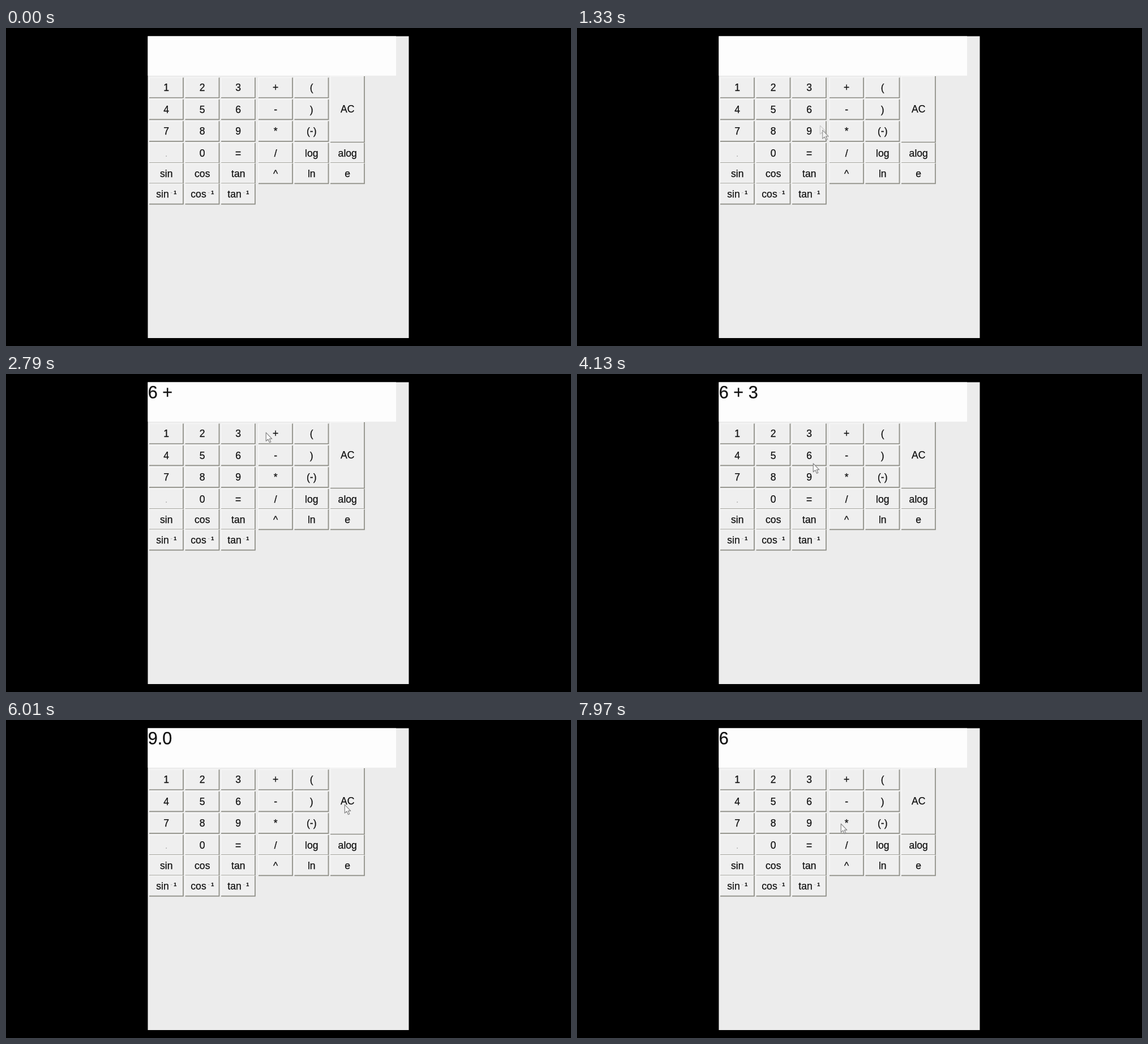
Write an HTML page that moves like this. It is 998 px wide and 561 px high and loops after 8000 ms.

```html
<!DOCTYPE html>
<html lang="en">
<head>
<meta charset="utf-8">
<title>Calculator</title>
<style>
  html, body { margin: 0; width: 100%; height: 100%; overflow: hidden; background: #000; }
  svg { display: block; width: 100vw; height: 100vh; }
  text { font-family: "Liberation Sans", Arial, sans-serif; fill: #111; stroke: #111; stroke-width: .25; }
  .key { font-size: 17.6px; text-anchor: middle; }
  .power { font-size: 9px; font-weight: bold; }
  .faint { opacity: .5; fill-opacity: .5; stroke: none; }
  #readout { font-size: 30.6px; white-space: pre; }
  .edge { fill: none; stroke-width: 1.7; }
  .arrow { fill: #fafafa; stroke: #858585; stroke-width: 1.2; stroke-linejoin: round; }
</style>
</head>
<body>
<svg viewBox="0 0 998 561">
  <defs><path id="arrow" d="M0 0V15L3.5 11.8L6.2 17.5L8.5 16.4L6 11H10.5Z"/></defs>
  <rect width="998" height="561" fill="#000"/>
  <rect x="250.5" y="14.5" width="461" height="532.5" fill="#ececec"/>
  <rect x="250.5" y="14.5" width="438.5" height="69.5" fill="#fdfdfd"/>
  <text id="readout" x="250.8" y="43"></text>
  <g id="keys"></g>
  <use id="ghost" class="arrow" href="#arrow"/>
  <use id="cursor" class="arrow" href="#arrow"/>
</svg>
<script>
const LOOP = 8000, STEP = 1000 / 24;
const $ = id => document.getElementById(id);

// Keypad
const KEY_W = 60.5, KEY_H = 35.5;
const layout = ["1 2 3 + (", "4 5 6 - )", "7 8 9 * (-)", ". 0 = / log alog", "sin cos tan ^ ln e", "sin⁻¹ cos⁻¹ tan⁻¹"];
const columnX = c => 253 + 63.5 * c + (c > 2 ? 2.5 : 0);
const rowBottom = r => 123 + 38.4 * Math.min(r, 3) + 36.2 * Math.max(r - 3, 0);
const centers = {};

function caption(label) {
  if (label === ".") return '<tspan class="faint">.</tspan>';
  return label.replace("⁻¹", '<tspan class="power" dx="3" dy="-6"><tspan class="faint">-</tspan><tspan dx="2.5">1</tspan></tspan>');
}

function key(label, x, bottom, height = KEY_H) {
  const right = x + KEY_W, top = bottom - height;
  const [cx, cy] = centers[label] = [x + KEY_W / 2, bottom - height / 2];
  return `<rect x="${x}" y="${top}" width="${KEY_W}" height="${height}" fill="#efefef"/>
    <path class="edge" stroke="#f6f6f6" d="M${x} ${bottom}V${top}H${right}"/>
    <path class="edge" stroke="#8c8c84" d="M${x} ${bottom}H${right - .5}V${top}"/>
    <text class="key" x="${cx}" y="${cy + 6.2}">${caption(label)}</text>`;
}

$("keys").innerHTML = layout.map((line, r) =>
  line.split(" ").map((label, c) => key(label, columnX(c), rowBottom(r))).join("")
).join("") + key("AC", columnX(5), 201.5, 116.5);

// Each press: key, time, and where the pointer rests relative to the key's centre
const REST = 240, LEAD = 150, ENTER = 600;
const presses = [
  ["6", 1750, 7, 6], ["+", 2600, -17, -2], ["3", 3450, 7, 3], ["=", 4800, 7, 3],
  ["AC", 6100, -5, 6], ["6", 7300, 7, 6], ["*", 8100, -10, 1]
].map(([label, time, dx, dy]) => ({ label, time, x: centers[label][0] + dx, y: centers[label][1] + dy }));
const stops = [{ time: ENTER - REST, x: 511, y: 290 }, ...presses];

function pointerAt(time) {
  const i = Math.max(1, stops.findIndex(s => s.time > time));
  const from = stops[i - 1], to = stops[i];
  const leave = from.time + REST, arrive = to.time - LEAD;
  const u = Math.min(1, Math.max(0, (time - leave) / (arrive - leave)));
  const ease = u * u * (3 - 2 * u);
  // Sideways journeys sag a little
  const sag = .12 * Math.abs(to.x - from.x) * Math.sin(Math.PI * ease);
  return [from.x + (to.x - from.x) * ease, from.y + (to.y - from.y) * ease + sag];
}

function type(text, { label }) {
  if (label === "AC") return "";
  if (label === "=") return text.split("+").reduce((sum, n) => sum + Number(n), 0).toFixed(1);
  return text + (label === "+" ? " + " : label);
}

function place(node, [x, y], opacity) {
  node.setAttribute("transform", `translate(${x.toFixed(1)} ${y.toFixed(1)})`);
  node.setAttribute("opacity", opacity);
}

function draw(now) {
  const time = Math.floor(((now % LOOP) + 4) / STEP) * STEP % LOOP;
  $("readout").textContent = presses.filter(p => p.time <= time).reduce(type, "");

  const shown = time >= ENTER;
  const here = pointerAt(time), next = pointerAt(time + STEP);
  const fast = Math.hypot(next[0] - here[0], next[1] - here[1]) > 8.5;
  place($("cursor"), here, shown ? (fast ? .8 : 1) : 0);
  place($("ghost"), next, shown && fast ? .35 : 0);
}

const start = performance.now();
(function tick() {
  draw(performance.now() - start);
  requestAnimationFrame(tick);
})();
</script>
</body>
</html>
```
